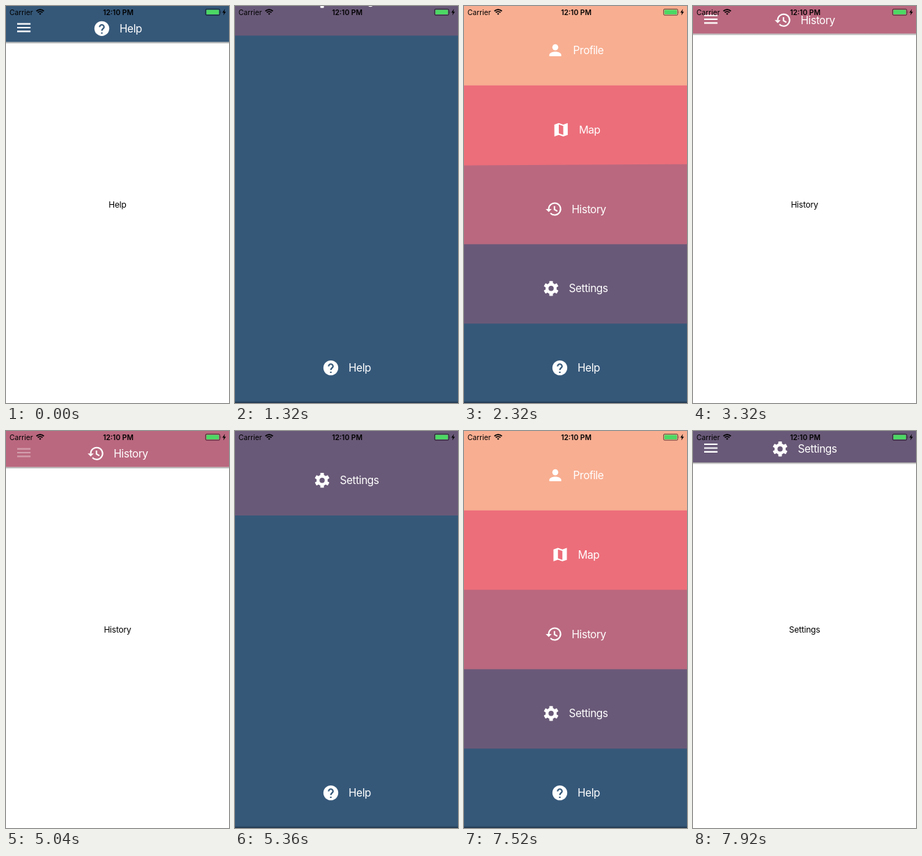
An HTML page for the animation above (8 s loop, 320x569 px).

```html
<!DOCTYPE html>
<html lang="en">
<head>
<meta charset="utf-8">
<title>Falling menu</title>
<style>
  html, body { margin: 0; width: 100%; height: 100%; overflow: hidden; background: #fff; }
  svg { display: block; width: 100%; height: 100%; }
  text { font-family: Inter, Roboto, sans-serif; }
  .label { font-size: 15.36px; letter-spacing: -.4px; fill: #fff; }
  .body { font-size: 12px; letter-spacing: -.2px; text-anchor: middle; }
  .status { font-size: 10.24px; }
</style>
</head>
<body>
<svg id="stage" viewBox="0 0 320 569" preserveAspectRatio="none">
  <defs>
    <linearGradient id="shade" x2="0" y2="1">
      <stop stop-color="#000" stop-opacity=".42"/>
      <stop offset="1" stop-color="#000" stop-opacity="0"/>
    </linearGradient>
  </defs>
  <rect width="320" height="569" fill="#fff"/>
  <text id="body" class="body" x="160" y="289"></text>
  <g id="header">
    <rect y="51.5" width="320" height="3" fill="url(#shade)"/>
    <rect id="bar" y="-20" width="320" height="71.5"/>
    <path id="burger" d="M16 25.6h19.2M16 31h19.2M16 36.4h19.2" stroke="#fff" stroke-width="2.1"/>
    <g id="title"></g>
  </g>
  <g id="menu"></g>
  <g id="status">
    <text class="status" x="5" y="12.6">Carrier</text>
    <g fill="none" stroke="#000" stroke-width="1.7">
      <path d="M43.6 7.3a7.6 7.6 0 0 1 10.8 0M45.6 9.4a4.8 4.8 0 0 1 6.8 0"/>
    </g>
    <path d="M47.3 11a2.4 2.4 0 0 1 3.4 0L49 12.8z"/>
    <text class="status" x="161" y="12.6" text-anchor="middle" font-weight="600">12:10 PM</text>
    <rect x="286.4" y="4.4" width="20.4" height="8.8" rx="1.6" fill="none" stroke="#000" stroke-opacity=".65" stroke-width=".9"/>
    <rect x="287.6" y="5.6" width="18" height="6.4" rx=".6" fill="#4cd964"/>
    <path d="M307.8 7.2q1.3 1.6 0 3.2z" fill-opacity=".65"/>
    <path d="M314.2 4.2l-3.8 5.2h2.4l-1 4 3.8-5.2h-2.4z"/>
  </g>
</svg>
<script>
const WIDTH = 320, HEIGHT = 569, SLOT = HEIGHT / 5, LOOP = 8000, STEP = 40;
const HEADER = 52, ICON = 25.6;
const FALL = 190, FIRST_FALL = 32;

const tooth = angle => `<rect x="9.6" y="2" width="4.8" height="6" rx=".6" transform="rotate(${angle} 12 12)"/>`;
const items = [
  { name: 'Profile', color: '#f8ae91', x: 131,
    icon: '<circle cx="12" cy="8" r="4"/><path d="M12 14c-2.7 0-8 1.3-8 4v2h16v-2c0-2.700-5.300-4-8-4z"/>' },
  { name: 'Map', color: '#ec6e7a', x: 138,
    icon: '<path fill-rule="evenodd" d="M21 3L15 5.100 9 3 3 5v16l6-2.100 6 2.100 6-2zM15 19l-6-2.100V5l6 2.100z"/>' },
  { name: 'History', color: '#ba687f', x: 129,
    icon: '<path d="M5 12a8 8 0 1 1 2.350 5.650M12.750 8v4.600l3.900 2.300" fill="none" stroke="#fff" stroke-width="1.900"/><path d="M1 12h8l-4 4z"/>' },
  { name: 'Settings', color: '#695978', x: 125,
    icon: '<circle cx="12" cy="12" r="5.500" fill="none" stroke="#fff" stroke-width="4"/>' +
      [0, 60, 120, 180, 240, 300].map(tooth).join('') },
  { name: 'Help', color: '#355879', x: 137.5,
    icon: '<circle cx="12" cy="12" r="10"/><path d="M9 10a3 3 0 0 1 6 0c0 2-3 2.200-3 5M12 17v2" fill="none" stroke="#355879" stroke-width="2"/>' }
];
const [HISTORY, SETTINGS, HELP] = [2, 3, 4];

// Menu visits: when it opens, when an entry is chosen, and when the header enters
const visits = [
  { open: 1040, pick: 3080, enter: 3200, page: HISTORY },
  { open: 5040, pick: 7520, enter: 7750, page: SETTINGS }
];

const $ = id => document.getElementById(id);

function label({ name, x, icon }, y) {
  return `<g fill="#fff" transform="translate(${x - ICON / 2} ${y - ICON / 2}) scale(${ICON / 24})">${icon}</g>
    <text class="label" x="${x + ICON}" y="${y + 5.6}">${name}</text>`;
}

// Every panel is a full screen tall; its lower edge rests at its slot.
const bottom = i => SLOT * (i + 1);
$('menu').innerHTML = items.map((item, i) => `<g>
  <rect x="-40" y="${bottom(i) - HEIGHT - 40}" width="${WIDTH + 80}" height="${HEIGHT + 40}" fill="${item.color}"/>
  ${i === HELP ? `<rect x="-40" y="${HEIGHT - 3}" width="400" height="3" fill="url(#shade)" transform="rotate(180 160 ${HEIGHT - 1.5})"/>` : ''}
  ${label(item, bottom(i) - 50.4)}</g>`).reverse().join('');
const panels = [...$('menu').children].reverse();

// A panel sways when the next one lands on it.
function sway(t) {
  if (t <= 0 || t > 330) return 0;
  return -3.56 * Math.exp(-.008 * t) * Math.sin(2 * Math.PI * t / 250);
}

function drawMenu(elapsed, lift) {
  panels.forEach((panel, i) => {
    const start = FIRST_FALL + (HELP - i) * FALL;
    const p = Math.min(1, Math.max(0, (elapsed - start) / FALL));
    const angle = i ? sway(elapsed - start - 2 * FALL) : 0;
    panel.style.display = p > 0 ? '' : 'none';
    panel.setAttribute('transform',
      `translate(0 ${bottom(i) * (p * p - 1) - lift}) rotate(${angle} 160 ${bottom(i) - HEIGHT / 2})`);
  });
}

let shown = -1;
function showPage(i) {
  if (i === shown) return;
  shown = i;
  $('body').textContent = items[i].name;
  $('bar').setAttribute('fill', items[i].color);
  $('title').innerHTML = label(items[i], 32.3);
}

function draw(t) {
  const visit = visits.filter(v => t >= v.open).pop();
  const picked = visit && t >= visit.pick;
  const menuOn = visit && t < visit.enter;
  const index = visits.indexOf(visit);
  showPage(picked ? visit.page : index > 0 ? visits[index - 1].page : HELP);

  $('menu').style.display = menuOn ? '' : 'none';
  if (menuOn) {
    const rise = Math.max(0, 1 - (visit.enter - t) / 100);
    drawMenu(t - visit.open, HEIGHT * rise * rise);
  }
  const settled = visit ? Math.max(0, t - visit.enter) : Infinity;
  const offset = picked ? -HEADER * Math.exp(-.0122 * settled) : 0;
  $('header').setAttribute('transform', `translate(0 ${offset})`);
  $('burger').setAttribute('opacity', visit && !picked ? .35 : 1);
}

const origin = performance.now();
function tick() {
  const t = (performance.now() - origin) % LOOP;
  draw(Math.floor(t / STEP) * STEP);
  requestAnimationFrame(tick);
}
tick();
</script>
</body>
</html>
```
